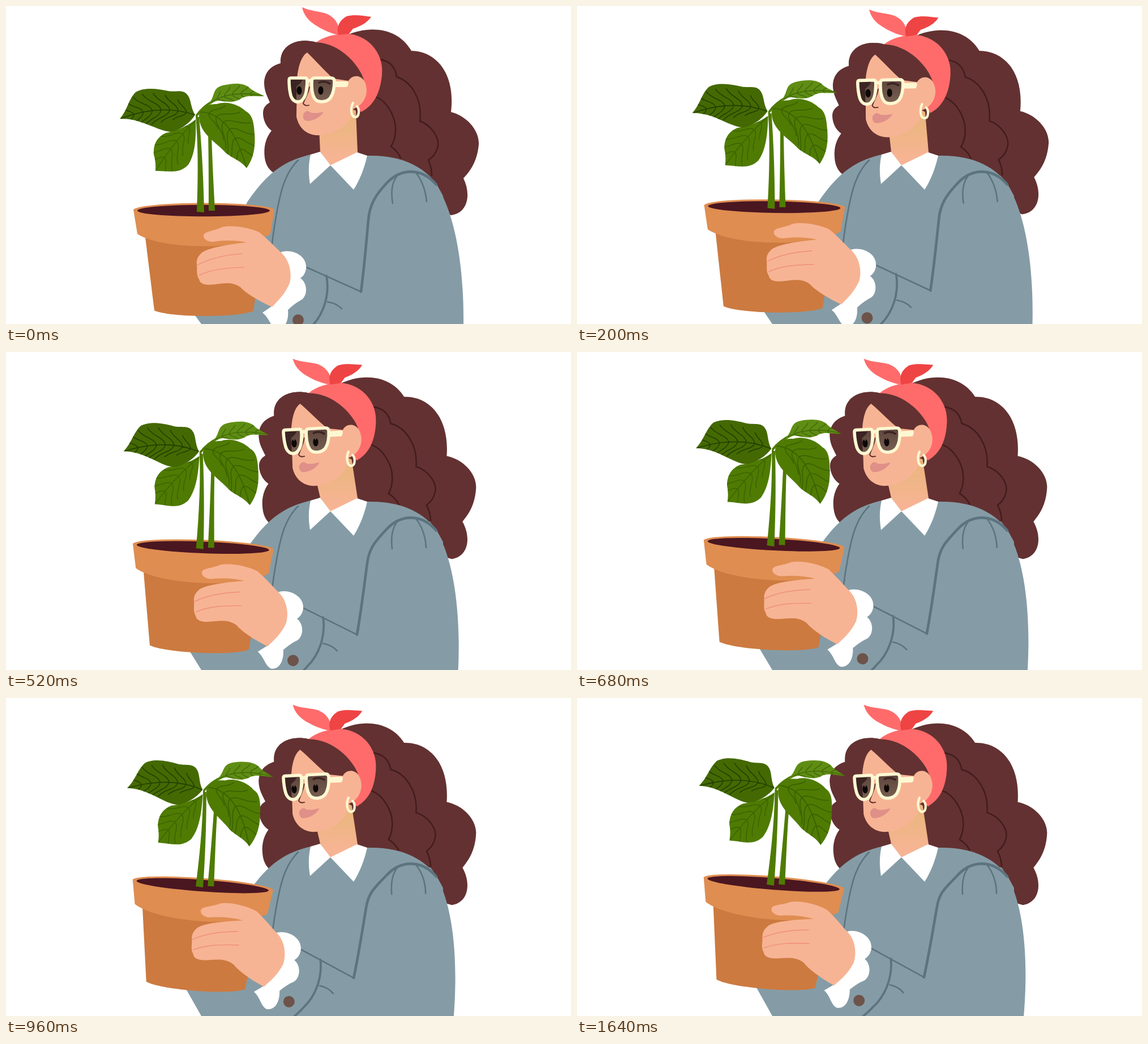
Recreate the animation shown at these times as an HTML page. Size 998 px wide and 561 px high, loop 1680 ms.

```html
<!DOCTYPE html>
<html lang="en">
<head>
<meta charset="utf-8">
<title>Woman with a potted plant</title>
<style>
html, body { margin: 0; width: 100%; height: 100%; overflow: hidden; background: #fff; }
svg { display: block; width: 100%; height: 100%; }
.line { fill: none; stroke-linecap: round; stroke-linejoin: round; }
.hair { fill: #633131; }
.skin { fill: #f7b494; }
.cloth { fill: #859ca6; }
.seam { stroke: #5c747f; stroke-width: 2.6; }
.strand { stroke: #421c1d; stroke-width: 2.4; }
.crease { stroke: #ef947b; stroke-width: 1.7; }
.frame { stroke: #fdf8d2; stroke-width: 5.6; }
</style>
</head>
<body>
<svg viewBox="0 0 998 561">
  <defs>
    <linearGradient id="neckTone" gradientUnits="userSpaceOnUse" x1="0" y1="205" x2="0" y2="270">
      <stop offset="0" stop-color="#ebb67f"/>
      <stop offset="1" stop-color="#f7b494"/>
    </linearGradient>
    <linearGradient id="lensTone" gradientUnits="userSpaceOnUse" x1="0" y1="126" x2="0" y2="170">
      <stop offset="0" stop-color="#5d443b"/>
      <stop offset="1" stop-color="#786052"/>
    </linearGradient>
    <path id="lensL" d="M503 127H529Q532 127 532 134C531 150 530 160 522 167C516 171 507 170 503 158C501 150 500 140 500 131Q500 127 503 127Z"/>
    <path id="lensR" d="M545 127H574Q580 127 580 133C580 145 578 155 573 162C566 171 550 171 545 163C540 155 540 145 540 133Q540 127 545 127Z"/>
    <clipPath id="lensClip"><use href="#lensL"/></clipPath>
  </defs>

  <g id="backHair">
    <path class="hair" d="M600 52C645 32 694 40 716 79C761 80 794 120 786 187C814 194 837 220 835 245C832 275 820 291 808 304C822 332 816 366 786 369L700 340L560 310L474 295C466 290 459 282 457 268C455 252 457 235 469 220C459 213 454 200 454 189C454 180 458 175 466 170C461 158 456 150 456 135C457 118 466 106 485 101C483 68 515 55 548 64Z"/>
    <path class="line strand" d="M660 94C677 97 688 107 690 125C716 133 736 165 731 203C750 210 765 230 763 246C761 258 755 266 746 272Q752 284 752 299"/>
    <path class="line strand" d="M655 161C675 170 689 198 688 219Q688 235 680 248Q692 256 697 268"/>
  </g>

  <path id="body" class="cloth"/>
  <path class="line seam" d="M516 272C492 295 485 330 480 355C475 382 472 398 470 420"/>
  <path id="neck" fill="url(#neckTone)"/>
  <path fill="#fff" d="M555 257L573 281L537 314C534 295 534 280 538 262Z"/>
  <path fill="#fff" d="M573 281L620 258L638 264C633 286 625 307 614 324Z"/>

  <g id="head">
    <path class="hair" d="M485 101C485 68 515 55 548 64L590 62L640 130L605 140L540 150L520 190L480 180Z"/>
    <path fill="#ff6b6b" d="M548 64C562 53 585 48 606 49C645 54 668 88 664 122C661 155 648 177 627 187L617 176L632 130C625 106 592 66 548 64Z"/>
    <path fill="#ff6b6b" d="M523 2C536 9 554 9 567 14C582 21 590 33 588 51C572 49 550 37 540 29C530 21 525 12 523 2Z"/>
    <path fill="#ef4444" d="M587 51C583 35 590 25 602 18C618 14 632 18 645 19C638 30 625 36 613 40L606 49Z"/>
    <path class="skin" d="M532 82C522 88 516 106 514 128L513 195C516 211 527 226 548 228C570 229 592 220 607 200L612 182C626 178 637 165 637 148C636 121 613 118 605 132L578 128C561 113 548 97 532 82Z"/>
    <path fill="#df9089" d="M525 191C529 184 534 184 538 188C546 190 553 188 561 187C555 197 542 203 531 203C525 201 524 196 525 191Z"/>
    <g clip-path="url(#lensClip)">
      <rect x="498" y="124" width="36" height="50" fill="url(#lensTone)"/>
      <rect x="498" y="124" width="15" height="50" fill="#3b2423"/>
      <path fill="#3b2423" d="M512 124H528L520 136L513 142Z"/>
    </g>
    <use href="#lensR" fill="url(#lensTone)"/>
    <path class="line" stroke="#3b2423" stroke-width="3.5" d="M553 135Q563 131 572 137"/>
    <g id="eyes">
      <ellipse cx="518" cy="149" rx="4.6" ry="7.5" fill="#0c0808"/>
      <ellipse cx="556" cy="149" rx="4.6" ry="7.5" fill="#0c0808"/>
      <path id="lids" fill="#654d44"/>
    </g>
    <path class="line" stroke="#552a2b" stroke-width="1.8" d="M536 143C534 155 527 165 525 172Q528 177 535 175"/>
    <use href="#lensL" class="line frame"/>
    <use href="#lensR" class="line frame"/>
    <path class="line frame" d="M532 133Q536 130 540 133"/>
    <path fill="#fdf8d2" d="M580 133H604Q606 138 602 143H580Z"/>
    <path class="line frame" style="stroke-width:4.2" d="M613 171C608 180 609 196 617 196C624 196 625 182 620 177"/>
  </g>

  <g id="arm">
    <path class="cloth" d="M690 300L748 300C790 345 810 450 808 570L808 650L520 650L540 470L640 380Z"/>
    <path class="line seam" style="stroke-width:3.8" d="M566 476C572 508 562 542 541 564Q526 583 505 597"/>
    <path class="line seam" d="M568 522Q583 524 593 534"/>
    <circle cx="516" cy="554" r="10" fill="#6d534a"/>
  </g>
  <path id="yoke" class="line seam" style="stroke-width:4.6"/>
  <path id="hem" class="line seam"/>
  <path id="ruffles" class="line seam"/>

  <g id="carry">
    <path fill="#cc7a40" d="M245 400L262 537C285 549 405 551 437 538L456 400Z"/>
    <path fill="#df8d51" d="M225 359L232 402C275 431 424 431 467 402L474 359Z"/>
    <ellipse cx="349.5" cy="360" rx="124.5" ry="12.5" fill="#df8d51"/>
    <ellipse cx="349" cy="361" rx="117" ry="10.3" fill="#4a1620"/>
    <g id="plant">
      <path fill="#4f7b02" d="M337 363L350 364C349 310 346 250 341 196L335 194C340 250 339 310 337 363Z"/>
      <path fill="#4f7b02" d="M358 361L369 361C367 320 364 270 363 222L357 222C358 270 358 320 358 361Z"/>
      <path class="line" stroke="#4f7b02" stroke-width="4" d="M337 193Q348 177 367 167"/>
    </g>
    <path fill="#fff" d="M486 434C505 428 533 440 530 464Q528 475 520 480C534 490 533 514 519 520Q511 524 498 536C500 556 492 571 478 570C467 566 465 550 453 541L472 528L470 470Z"/>
    <path class="skin" d="M349 407C347 397 366 398 382 390C400 386 430 391 447 399C460 409 475 425 486 435C500 447 506 470 501 489C492 510 480 520 470 531C450 522 425 508 414 496C400 486 385 489 370 491C355 493 343 492 341 482C336 475 338 468 337 458C336 448 338 443 345 436C355 427 390 421 425 417C405 413 385 413 365 416C357 416 350 412 349 407Z"/>
    <path class="line crease" d="M338 457C360 445 390 439 417 437M341 475C365 464 390 462 420 461"/>
  </g>
</svg>
<script>
const LOOP = 1680, STEP = 40, HEAD_MS = 480, ARM_MS = 1060, FLUTTER_MS = 760;
const NECK = { x: 710, y: 335, deg: -2.87 };
const SHOULDER = { x: 761, y: 322, deg: 4.58 };
const SOIL_Y = 363;
const $ = id => document.getElementById(id);
const unit = v => Math.min(1, Math.max(0, v));

function make(tag, attrs, parent) {
  const el = document.createElementNS('http://www.w3.org/2000/svg', tag);
  for (const k in attrs) el.setAttribute(k, attrs[k]);
  return parent.appendChild(el);
}

function turn(el, deg, x, y) {
  el.setAttribute('transform', `rotate(${deg} ${x} ${y})`);
}

// Where a point lands after turning a fraction k about a joint
function swing(x, y, joint, k) {
  const a = joint.deg * k * Math.PI / 180, dx = x - joint.x, dy = y - joint.y;
  const c = Math.cos(a), s = Math.sin(a);
  return `${(joint.x + dx * c - dy * s).toFixed(2)} ${(joint.y + dx * s + dy * c).toFixed(2)}`;
}

// Midrib plus curved side veins, trimmed by the leaf outline
function veins([bx, by], [cx, cy], [tx, ty], n, reach) {
  let d = `M${bx} ${by}Q${cx} ${cy} ${tx} ${ty}`;
  for (let i = 1; i <= n; i++) {
    const t = i / (n + 1.3), u = 1 - t;
    const x = u * u * bx + 2 * u * t * cx + t * t * tx;
    const y = u * u * by + 2 * u * t * cy + t * t * ty;
    let vx = u * (cx - bx) + t * (tx - cx), vy = u * (cy - by) + t * (ty - cy);
    const m = Math.hypot(vx, vy);
    vx /= m; vy /= m;
    const r = reach * Math.sin(Math.PI * (0.12 + 0.8 * t));
    for (const s of [-1, 1]) {
      const px = -vy * s, py = vx * s;
      const at = (f, g) => `${(x + vx * r * f + px * r * g).toFixed(1)} ${(y + vy * r * f + py * r * g).toFixed(1)}`;
      d += `M${x.toFixed(1)} ${y.toFixed(1)}C${at(0.1, 0.4)} ${at(0.65, 0.4)} ${at(0.95, 0.85)}`;
    }
  }
  return d;
}

const leaves = [
  { fill: '#4f7b02', vein: '#3d6502', base: [334, 203], mid: [300, 235], tip: [266, 288], n: 5, reach: 32,
    d: 'M335 200C318 214 298 221 282 224C265 232 260 246 261 262Q265 275 264 291C286 290 305 298 322 280C335 260 336 230 335 200Z',
    lift: (b, a) => 2.8 * b },
  { fill: '#446902', vein: '#223f00', base: [333, 192], mid: [275, 172], tip: [204, 198], n: 7, reach: 34,
    d: 'M201 199C215 183 216 165 229 152C245 143 268 146 287 150C300 152 311 147 319 155C328 164 325 178 334 192C325 207 305 221 290 222C265 220 238 197 201 199Z',
    lift: (b, a) => b },
  { fill: '#5f8d14', vein: '#436c08', base: [362, 170], mid: [395, 148], tip: [455, 158], n: 5, reach: 16,
    d: 'M360 170C370 157 364 145 383 140C400 136 421 134 432 146C440 152 447 154 456 159C440 160 428 157 417 162C402 173 387 168 375 167Q366 168 360 175Z',
    lift: (b, a) => 1.2 * a - 1.2 * b },
  { fill: '#4f7b02', vein: '#3a6002', base: [344, 187], mid: [398, 190], tip: [424, 283], n: 6, reach: 38,
    d: 'M341 197C340 182 351 173 372 173C392 166 414 176 424 186C436 192 438 208 439 225C441 250 437 269 425 286C414 272 402 270 388 259C370 239 343 226 341 197Z',
    lift: (b, a) => -2.2 * b }
];

leaves.forEach((leaf, i) => {
  leaf.el = make('g', {}, $('plant'));
  const clip = make('clipPath', { id: 'leaf' + i }, leaf.el);
  make('path', { d: leaf.d }, clip);
  make('path', { d: leaf.d, fill: leaf.fill }, leaf.el);
  make('path', {
    d: veins(leaf.base, leaf.mid, leaf.tip, leaf.n, leaf.reach),
    class: 'line', stroke: leaf.vein, 'stroke-width': 1.6, 'clip-path': `url(#leaf${i})`
  }, leaf.el);
});

function draw(ms) {
  const h = unit(ms / HEAD_MS), a = unit(ms / ARM_MS);
  const flutter = Math.sin(Math.PI * unit(ms / FLUTTER_MS));
  const hp = (x, y) => swing(x, y, NECK, h), ap = (x, y) => swing(x, y, SHOULDER, a);

  for (const id of ['backHair', 'head']) turn($(id), NECK.deg * h, NECK.x, NECK.y);
  for (const id of ['arm', 'carry']) turn($(id), SHOULDER.deg * a, SHOULDER.x, SHOULDER.y);

  $('neck').setAttribute('d', `M${hp(553, 215)}L555 257L573 282L621 258L${hp(618, 185)}L${hp(600, 175)}Z`);
  $('body').setAttribute('d',
    `M538 262C498 272 466 287 426 346L400 410L310 480L${ap(331, 542)}L345 561L770 561L772 335L761 315C740 285 700 262 637 264Z`);

  $('eyes').setAttribute('transform', `translate(0 ${2 * h})`);
  $('lids').setAttribute('d', [518, 556].map(x => `M${x - 3 * h} 140H${x + 3 * h}L${x} ${141 + 5 * h}Z`).join(''));

  $('yoke').setAttribute('d',
    `M760 315C735 286 698 284 671 314C652 334 ${ap(642, 352)} ${ap(640, 378)}C${ap(637, 410)} ${ap(633, 460)} ${ap(627, 504)}`);
  $('hem').setAttribute('d', `M${ap(627, 504)}L${ap(531, 461)}`);
  $('ruffles').setAttribute('d',
    `M690 301C681 313 680 330 ${683 - 2 * a} ${348 - 2 * a}M724 294C735 308 741 325 ${743 - 2 * a} 345`);

  // The plant leans sideways from the soil line up
  $('plant').setAttribute('transform', `translate(0 ${SOIL_Y}) skewX(${-a}) translate(0 ${-SOIL_Y})`);
  for (const leaf of leaves) turn(leaf.el, leaf.lift(flutter, a), ...leaf.base);
}

function tick(now) {
  draw(Math.floor(now % LOOP / STEP) * STEP);
  requestAnimationFrame(tick);
}
draw(0);
requestAnimationFrame(tick);
</script>
</body>
</html>
```
